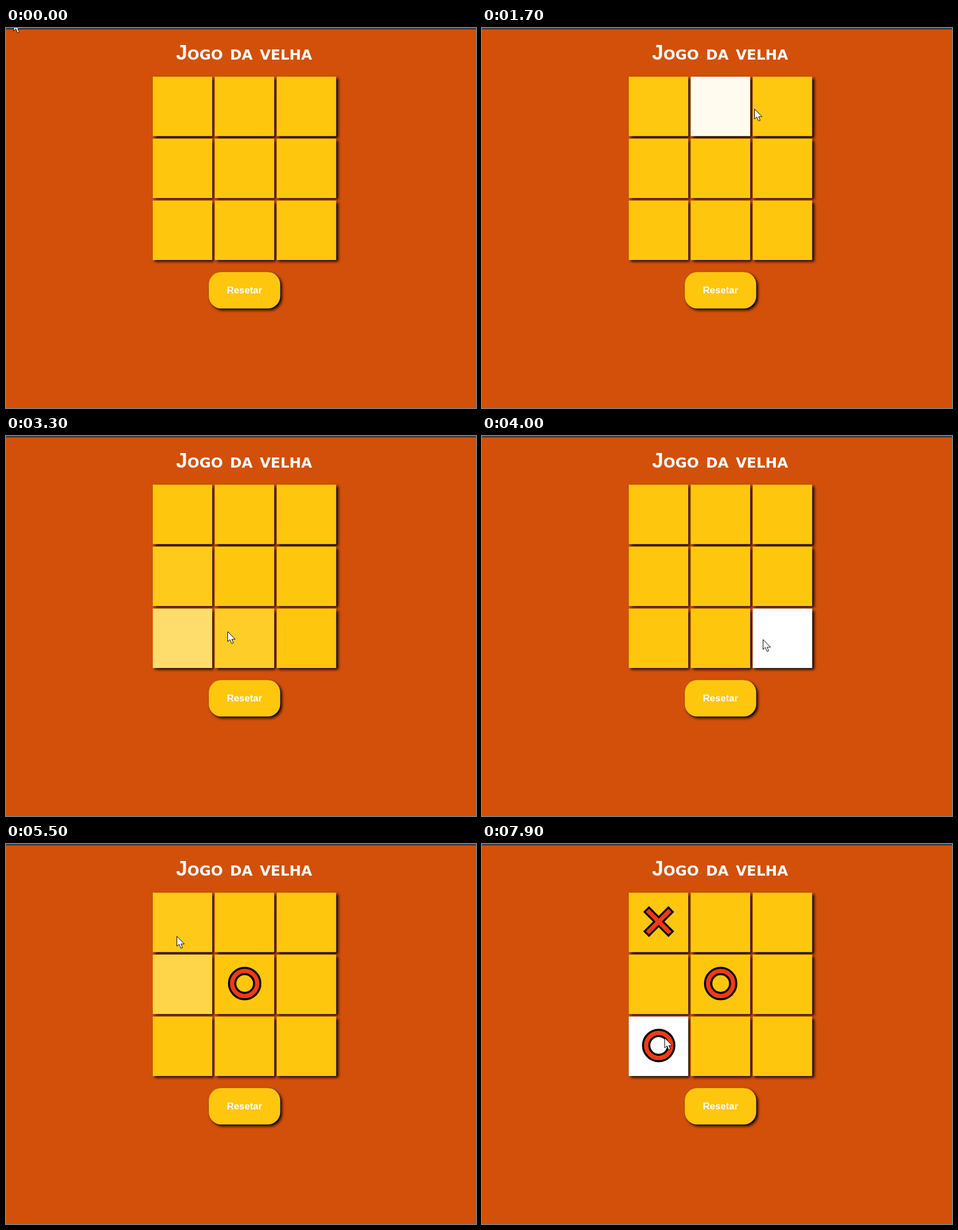
Write an HTML page with a canvas that moves like this. It is 832x673 px and loops after 8000 ms.

```html
<!DOCTYPE html>
<html lang="pt-BR">
<head>
<meta charset="utf-8">
<title>Jogo da velha</title>
<style>
  html, body { margin: 0; width: 100%; height: 100%; overflow: hidden; background: #d2500a; }
  body { position: relative; color: #fff; font-family: "Liberation Sans", Arial, sans-serif; font-weight: bold; }
  canvas { position: absolute; left: 0; top: 0; }
  h1 { position: absolute; left: 301px; top: 23px; margin: 0; white-space: nowrap;
       font: small-caps bold 36px/42px "DejaVu Sans", Verdana, sans-serif; }
  h1::first-letter { font-family: "Liberation Sans", Arial, sans-serif; }
  .reset { position: absolute; left: 359px; top: 432px; width: 126.4px;
           font-size: 17px; line-height: 65px; text-align: center; }
</style>
</head>
<body>
<canvas width="832" height="673"></canvas>
<h1>Jogo da velha</h1>
<div class="reset">Resetar</div>
<script>
const LOOP = 8000, STEP = 100, FADE = 500;
const LEFT = 259.8, TOP = 86.2, SIZE = 105.3, PITCH = 109.7;

// Pointer key points: [ms, x, y]
const PATH = [
  [0, 13, -13], [600, 190, 236], [900, 259, 150], [1700, 482, 143],
  [2000, 530, 190], [2100, 530, 190], [3000, 322, 292], [3225, 361, 340],
  [3300, 392, 346], [3450, 497, 360], [4050, 497, 360], [4600, 430, 232],
  [4900, 430, 232], [5050, 500, 330], [5310, 330, 345], [5500, 302, 163],
  [6350, 302, 163], [6600, 368, 230], [6900, 370, 259], [7030, 392, 272],
  [7200, 362, 281], [7400, 323, 343], [LOOP, 323, 343]
];

// Moves: [ms, cell, mark]
const MARKS = [[4900, 4, "O"], [6200, 0, "X"], [7900, 6, "O"]];

const canvas = document.querySelector("canvas");
const ctx = canvas.getContext("2d");

// The CSS "ease" curve, cubic-bezier(.25, .1, .25, 1)
function ease(x) {
  if (x <= 0) return 0;
  if (x >= 1) return 1;
  const curve = (u, a, b) => 3 * u * (1 - u) ** 2 * a + 3 * u * u * (1 - u) * b + u ** 3;
  let lo = 0, hi = 1;
  for (let i = 0; i < 20; i++) {
    const mid = (lo + hi) / 2;
    if (curve(mid, 0.25, 0.25) < x) lo = mid; else hi = mid;
  }
  return curve(lo, 0.1, 1);
}

function pointerAt(t) {
  const next = PATH.findIndex(p => p[0] > t);
  const [t0, x0, y0] = PATH[next - 1], [t1, x1, y1] = PATH[next];
  const k = (t - t0) / (t1 - t0);
  return [x0 + (x1 - x0) * k, y0 + (y1 - y0) * k];
}

const cellX = i => LEFT + PITCH * (i % 3);
const cellY = i => TOP + PITCH * Math.floor(i / 3);

function cellUnder(x, y) {
  for (let i = 0; i < 9; i++) {
    const dx = x - cellX(i), dy = y - cellY(i);
    if (dx >= 0 && dx < SIZE && dy >= 0 && dy < SIZE) return i;
  }
  return -1;
}

// Follow the pointer once and note when it enters and leaves each cell
function findVisits() {
  const visits = [];
  let current = -1;
  for (let t = 0; t < LOOP; t++) {
    const cell = cellUnder(...pointerAt(t));
    if (cell === current) continue;
    if (current >= 0) visits[visits.length - 1].leave = t;
    if (cell >= 0) visits.push({ cell, enter: t, leave: LOOP });
    current = cell;
  }
  return visits;
}
const VISITS = findVisits();

// An interrupted transition fades back in proportionally less time
function glow(t, { enter, leave }) {
  if (t < enter) return 0;
  if (t < leave) return ease((t - enter) / FADE);
  const peak = ease((leave - enter) / FADE);
  return peak * (1 - ease((t - leave) / (FADE * peak)));
}

function withShadow(paint) {
  ctx.save();
  ctx.shadowColor = "#000";
  ctx.shadowOffsetX = ctx.shadowOffsetY = 3;
  ctx.shadowBlur = 5;
  paint();
  ctx.restore();
}

function yellow(light) {
  const mix = from => Math.round(from + (255 - from) * light);
  return `rgb(${mix(254)}, ${mix(199)}, ${mix(14)})`;
}

function drawCell(i, t) {
  const lights = VISITS.filter(v => v.cell === i).map(v => glow(t, v));
  ctx.fillStyle = yellow(Math.max(0, ...lights));
  withShadow(() => ctx.fillRect(cellX(i), cellY(i), SIZE, SIZE));
}

function drawButton() {
  ctx.fillStyle = yellow(0);
  ctx.beginPath();
  ctx.roundRect(359, 432.2, 126.4, 64.6, 22);
  withShadow(() => ctx.fill());
}

function drawBar() {
  ctx.fillStyle = "#3a3a3c";
  ctx.fillRect(0, 0, canvas.width, 2.6);
}

function ring(r, width, color) {
  ctx.beginPath();
  ctx.arc(0, 0, r, 0, Math.PI * 2);
  ctx.lineWidth = width;
  ctx.strokeStyle = color;
  ctx.stroke();
}

function cross(reach, width, color) {
  ctx.fillStyle = color;
  ctx.fillRect(-reach, -width / 2, reach * 2, width);
  ctx.fillRect(-width / 2, -reach, width, reach * 2);
}

function drawMark(cell, mark) {
  ctx.save();
  ctx.translate(cellX(cell) + 53, cellY(cell) + 51.2);
  if (mark === "O") {
    ring(22.2, 14.8, "#000");
    ring(22.2, 7.6, "#f23a17");
  } else {
    ctx.rotate(Math.PI / 4);
    cross(31.6, 14.4, "#000");
    cross(28.2, 7.6, "#f23a17");
  }
  ctx.restore();
}

const ARROW = new Path2D("M0 0V17.5L4 14L7 21L10 20L7.2 13.5H13.2Z");

function drawPointer(x, y) {
  ctx.save();
  ctx.translate(Math.round(x) + 0.5, Math.round(y) + 0.5);
  ctx.fillStyle = "#fff";
  ctx.strokeStyle = "#000";
  ctx.lineWidth = 1;
  ctx.fill(ARROW);
  ctx.stroke(ARROW);
  ctx.restore();
}

function draw(t) {
  ctx.clearRect(0, 0, canvas.width, canvas.height);
  drawBar();
  for (let i = 0; i < 9; i++) drawCell(i, t);
  drawButton();
  for (const [at, cell, mark] of MARKS) if (t >= at) drawMark(cell, mark);
  drawPointer(...pointerAt(t));
}

const start = performance.now();
function tick() {
  const t = (performance.now() - start) % LOOP;
  draw(Math.floor(t / STEP) * STEP);
  requestAnimationFrame(tick);
}
tick();
</script>
</body>
</html>
```
